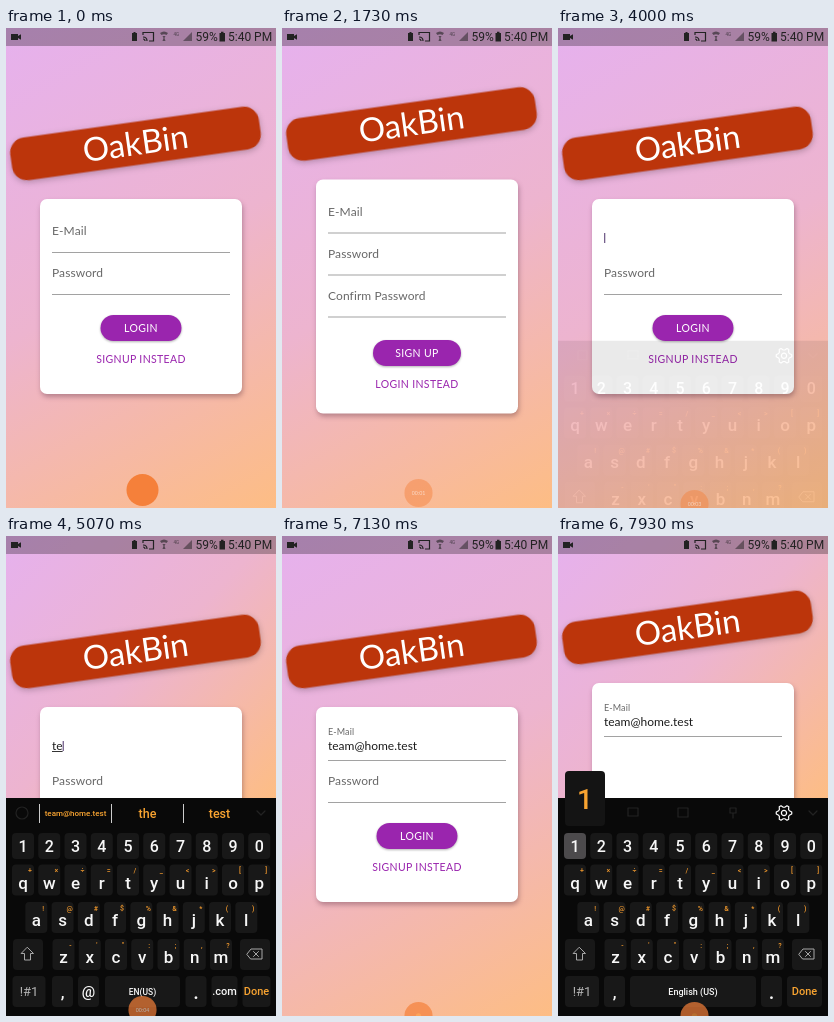
These frames come from a looping animation (270x480 px, 8000 ms). An HTML page:

```html
<!DOCTYPE html>
<html lang="en">
<head>
<meta charset="utf-8">
<title>Shop login</title>
<style>
  html, body { margin: 0; width: 100%; height: 100%; overflow: hidden; background: #fff; }
  svg { display: block; width: 100vw; height: 100vh; }
  text { font-family: Lato, "Open Sans", sans-serif; white-space: pre; }
  .mid { text-anchor: middle; }
  .label { font-size: 12px; fill: #686868; letter-spacing: .1px; }
  .value { font-size: 12px; fill: #1c1c1c; }
  .line { fill: #a2a2a2; }
  .caret { fill: #75608c; }
  .action { font-size: 10.5px; letter-spacing: .35px; }
  #banner rect { fill: #bc350b; filter: drop-shadow(0 2px 3px rgba(0,0,0,.24)); }
  #cardBox { fill: #fff; filter: drop-shadow(1px 3.5px 2.5px rgba(60,20,40,.32)); }
  #button { fill: #9a25ae; filter: drop-shadow(0 1.5px 1px rgba(0,0,0,.3)); }
  #status text, #keyboard text, #popup text { font-family: Roboto, "Noto Sans", sans-serif; }
  .key { fill: #181818; }
  .key.down { fill: #4c4a4c; }
  .glyph { fill: #f7f7f7; font-size: 17px; font-weight: 500; }
  .soft { fill: #b4b4b4; }
  .hint { fill: #f39a2d; font-size: 7px; font-weight: 500; }
  .orange { fill: #f9a431; font-weight: 500; }
  .icon { fill: none; stroke: #fff; stroke-width: 1.2; stroke-linejoin: round; stroke-linecap: round; }
  .dull { stroke: #a8a8a8; stroke-width: 1; }
  .faint { stroke: #222; }
</style>
</head>
<body>
<svg id="stage" viewBox="0 0 270 480" preserveAspectRatio="none">
  <defs>
    <linearGradient id="sky" gradientUnits="userSpaceOnUse" x1="0" y1="0" x2="270" y2="480">
      <stop offset="0" stop-color="#e6b1ee"/>
      <stop offset=".5" stop-color="#edb4cf"/>
      <stop offset="1" stop-color="#fdbd84"/>
    </linearGradient>
    <clipPath id="window"><rect id="windowBox" width="270" height="480"/></clipPath>
  </defs>

  <rect width="270" height="480" fill="#fff"/>
  <g clip-path="url(#window)">
    <rect width="270" height="480" fill="url(#sky)"/>
    <g id="scroll">
      <g id="banner" transform="translate(129.5 115.5) rotate(-8)">
        <rect x="-125.5" y="-21.5" width="251" height="43" rx="15"/>
        <text class="mid" y="11.5" font-size="33" fill="#fff">OakBin</text>
      </g>
      <rect id="cardBox" x="34" y="171" width="202" rx="7"/>
      <g id="fields">
        <text id="mailLabel" class="label" x="46">E-Mail</text>
        <text id="mailValue" class="value" x="46" y="213.5"></text>
        <rect id="composing" x="46" y="215" height="1" fill="#333"/>
        <rect id="mailLine" class="line" x="46" y="224" width="178" height="1"/>
        <rect id="mailCaret" class="caret" y="205" width="1.3" height="10"/>
        <text id="passLabel" class="label" x="46">Password</text>
        <rect id="passLine" class="line" x="46" y="266" width="178" height="1"/>
        <rect id="passCaret" class="caret" x="46" y="247" width="1.3" height="10"/>
        <g id="confirm">
          <text class="label" x="46" y="291">Confirm Password</text>
          <rect class="line" x="46" y="308" width="178" height="1"/>
        </g>
      </g>
      <g id="actions">
        <rect id="button" y="287" height="26" rx="13"/>
        <text id="mainAction" class="action mid" x="135" y="303.5" fill="#fff"></text>
        <text id="swapAction" class="action mid" x="135" y="335" fill="#9a25ae"></text>
      </g>
    </g>
  </g>

  <g id="status">
    <rect width="270" height="18" fill="#000" opacity=".28"/>
    <g fill="#222">
      <path d="M5 6h7v2l3-1.7v5.4l-3-1.7v2H5z"/>
      <path d="M126 5h1.500v-1h2v1h1.500v8h-5z"/>
      <path d="M154 5q4-3 8 0l-1.500 2q-2.500-1.700-5 0zM156.500 8h3l-1 2 1 3h-3l1-3z" opacity=".6"/>
      <path d="M186 4v9h-9z" opacity=".5"/>
      <path d="M213.500 5h1.500v-1.200h2.500V5h1.500v8.500h-5.500z"/>
      <text x="167.500" y="8" font-size="4.500" opacity=".7">4G</text>
      <text x="189.500" y="13" font-size="12">59%</text>
      <text x="222" y="13" font-size="12">5:40 PM</text>
    </g>
    <path d="M137 7V4.500h10.500v8.500H143M137 9q4 0 4 4M137 11q2 0 2 2" fill="none" stroke="#222" stroke-width="1.200"/>
  </g>

  <g id="keyboard">
    <rect y="262" width="270" height="280" fill="#090909"/>
    <g id="tools">
      <path class="icon faint" d="M20 272h9v9h-9zM70 272h10v8h-10zM120 272h10v9h-10zM172 272h6v5h-6zM175 277v5"/>
      <g transform="translate(226 277)">
        <path id="gear" class="icon"/>
        <circle class="icon" r="2.600"/>
      </g>
    </g>
    <g id="wordBar">
      <path d="M33.500 268v19M105.500 268v19M177.500 268v19" stroke="#ccc"/>
      <text class="orange mid" x="69.500" y="280" font-size="8">team@home.test</text>
      <text class="orange mid" x="141.500" y="281.500" font-size="12.500">the</text>
      <text class="orange mid" x="213.500" y="281.500" font-size="12.500">test</text>
    </g>
    <g id="mailBar">
      <path d="M33.500 268v18" stroke="#ddd"/>
      <text class="orange mid" x="151.500" y="281.500" font-size="12.500">team4@home.test</text>
    </g>
    <path class="icon faint" d="M251 275l4 4 4-4"/>
    <circle id="modeIcon" class="icon faint" cx="16" cy="277" r="6"/>
  </g>

  <g id="popup">
    <rect x="-20" y="-62" width="40" height="55" rx="4" fill="#141414"/>
    <text class="orange mid" y="-24" font-size="28"></text>
  </g>

  <g id="bubble">
    <circle r="16" fill="#f5803a"/>
    <text id="clock" class="mid" y="2" font-size="6" fill="#fff"></text>
    <circle id="dot" r="3" fill="#ff9a40"/>
  </g>
</svg>

<script>
const LOOP = 8000;
const $ = id => document.getElementById(id);
const clamp = v => Math.min(1, Math.max(0, v));
const ramp = (t, from, length) => clamp((t - from) / length);
const ease = p => p * p * (3 - 2 * p);
const mix = (a, b, p) => a + (b - a) * p;
const within = (t, from, to) => t >= from && t < to;
const set = (node, attrs) => { for (const k in attrs) node.setAttribute(k, attrs[k]); };
const show = (id, on) => set($(id), { opacity: +on });
const shift = (id, y) => set($(id), { transform: `translate(0 ${y})` });

function add(parent, tag, attrs, text) {
  const node = document.createElementNS('http://www.w3.org/2000/svg', tag);
  set(node, attrs);
  if (text) node.textContent = text;
  parent.append(node);
  return node;
}

// Keyboard
const keys = {};
function addKey(parent, name, x, y, w, h, size, cls = 'glyph') {
  const rect = add(parent, 'rect', { class: 'key', x: x - w / 2, y: y - h / 2, width: w, height: h, rx: 4 });
  if (name) add(parent, 'text', { class: cls + ' mid', x, y: y + size * .36, style: `font-size:${size}px` }, name);
  return keys[name] = { rect, x, top: y - h / 2 };
}

const board = $('keyboard');
const STEP = 26.25;
[...'1234567890'].forEach((c, i) => addKey(board, c, 17 + i * STEP, 310, 22, 26, 16));
const rows = [
  ['qwertyuiop', '+×÷=/_<>[]', 17, 344, 347],
  ['asdfghjkl', '!@#$%&*()', 30.3, 381.5, 384],
  ['zxcvbnm', '-\'":;,?', 57.5, 418.5, 421]
];
for (const [letters, hints, x0, y, textY] of rows) {
  [...letters].forEach((c, i) => {
    const x = x0 + i * STEP;
    keys[c] = addKey(board, '', x, y, 22, 31, 0);
    add(board, 'text', { class: 'glyph mid', x, y: textY + 5.5 }, c);
    add(board, 'text', { class: 'hint mid', x: x + 7, y: y - 7 }, hints[i]);
  });
}
addKey(board, '', 22, 418.5, 30, 31, 0);
addKey(board, '', 249, 418.5, 30, 31, 0);
add(board, 'path', { class: 'icon dull', d: 'M21.500 411.500l6 6h-3v6.500h-6v-6.500h-3z' });
add(board, 'path', { class: 'icon dull', d: 'M241 418l4-5h11v10h-11zM247.500 415.500l5 5M252.500 415.500l-5 5' });

const mailRow = add(board, 'g', {});
const passRow = add(board, 'g', {});
const bottom = (parent, list) => list.forEach(([name, x, w, size, cls]) =>
  addKey(parent, name, x, 455.5, w, 31, size, cls));
bottom(mailRow, [['!#1', 23, 33, 13, 'soft'], [',', 56.5, 21, 17], ['@', 82.5, 21, 15], ['EN(US)', 136.5, 75, 8.5],
  ['.', 190, 21, 20], ['.com', 218.5, 26, 11], ['Done', 250.5, 28, 11, 'orange']]);
const doneKey = keys.Done.rect;
bottom(passRow, [['!#1', 24, 34, 13, 'soft'], [',', 56.5, 21, 17], ['English (US)', 135, 126, 9],
  ['.', 213.5, 21, 20], ['Done', 246.5, 35, 11, 'orange']]);

// Gear outline: six teeth on a circle
let gear = '';
for (let i = 0; i < 24; i++) {
  const a = (i - .5) * Math.PI / 12, r = i % 4 < 2 ? 7.8 : 5.8;
  gear += (i ? 'L' : 'M') + (r * Math.cos(a)).toFixed(2) + ' ' + (r * Math.sin(a)).toFixed(2);
}
set($('gear'), { d: gear + 'z' });

const presses = [['t', 4470, 4670], ['e', 4930, 5030], ['1', 7930, LOOP]];

// The column stays centred, so banner and card rise as the card grows
function drawCard(t) {
  const open = ease(ramp(t, 1400, 300)) - ease(ramp(t, 2270, 300));
  const signup = within(t, 1400, 2270);
  const scroll = 24 * ease(ramp(t, 7400, 150));
  shift('scroll', -19.5 * open - scroll);
  set($('cardBox'), { height: 195 + 39 * open });
  shift('actions', 44.5 * open);
  set($('confirm'), { opacity: open, transform: `translate(0 ${-14 * (1 - open)})` });
  const w = signup ? 88 : 81;
  set($('button'), { x: 135 - w / 2, width: w });
  $('mainAction').textContent = signup ? 'SIGN UP' : 'LOGIN';
  $('swapAction').textContent = signup ? 'LOGIN INSTEAD' : 'SIGNUP INSTEAD';
}

// Focused labels and lines take the white accent, so they vanish on the card
function drawLabel(id, base, lift, opacity) {
  set($(id), { y: base - 8 * lift, opacity, style: `font-size:${mix(12, 9, lift)}px` });
}

function drawFields(t) {
  const mailLift = ease(ramp(t, 3700, 200));
  const mailSeen = 1 - ramp(t, 3700, 150) + ramp(t, 6450, 60);
  drawLabel('mailLabel', 207, mailLift, mailSeen);
  set($('mailLine'), { opacity: mailSeen });
  const passLift = ease(ramp(t, 7150, 200));
  const passSeen = 1 - ramp(t, 7150, 150);
  drawLabel('passLabel', 249, passLift, passSeen);
  set($('passLine'), { opacity: passSeen });

  const typed = t < 4670 ? '' : t < 5030 ? 't' : t < 5550 ? 'te' : 'team@home.test';
  $('mailValue').textContent = typed;
  const width = typed ? $('mailValue').getComputedTextLength() : 0;
  set($('composing'), { width, opacity: +(t < 5550) });
  set($('mailCaret'), { x: 46 + width });

  const since = t - [3700, 4670, 5030, 5550].reduce((a, b) => t >= b ? b : a, 0);
  show('mailCaret', within(t, 3700, 6450) && since % 1000 < 500);
  show('passCaret', t >= 7150 && (t - 7150) % 1000 < 500);
}

function drawKeyboard(t) {
  const leaving = ease(ramp(t, 6480, 200));
  const first = ease(ramp(t, 3960, 240)) - leaving;
  const second = ease(ramp(t, 7290, 240));
  const shown = t < 7000 ? first : second;
  const travel = within(t, 6480, 7000) ? 25 : 55;
  set(board, { opacity: shown });
  shift('keyboard', travel * (1 - shown));

  const pass = t > 7000;
  set(mailRow, { opacity: +!pass });
  set(passRow, { opacity: +pass });
  show('tools', t < 4670 || pass);
  show('wordBar', within(t, 4670, 5550));
  show('mailBar', within(t, 5550, 7000));
  show('modeIcon', within(t, 4670, 7000));
  doneKey.classList.toggle('down', within(t, 6200, 6700));

  show('popup', false);
  for (const [name, from, to] of presses) {
    const on = within(t, from, to), key = keys[name];
    key.rect.classList.toggle('down', on);
    if (!on) continue;
    set($('popup'), { opacity: 1, transform: `translate(${Math.max(27, key.x)} ${key.top})` });
    $('popup').lastElementChild.textContent = name;
  }

  const resized = within(t, 4200, 6430) || t >= 7400;
  const height = resized ? 262 : 480;
  set($('windowBox'), { height });
  set($('sky'), { y2: height });
}

function drawBubble(t) {
  const dim = ramp(t, 1330, 200), dock = ease(ramp(t, 3670, 250));
  const y = 462 + 3 * dim + 11 * dock - 2 * ramp(t, 4200, 200) + 6 * ramp(t, 6200, 200);
  const opacity = 1 - .55 * dim + .25 * ramp(t, 4200, 200);
  set($('bubble'), { transform: `translate(136.5 ${y}) scale(${mix(1, .88, dim)})`, opacity });
  $('clock').textContent = '00:0' + Math.floor(Math.max(0, t - 200) / 1000);
  show('clock', within(t, 1400, 6200));
  show('dot', t >= 6200);
}

const start = performance.now();
function frame() {
  const t = (performance.now() - start) % LOOP;
  drawCard(t);
  drawFields(t);
  drawKeyboard(t);
  drawBubble(t);
  requestAnimationFrame(frame);
}
frame();
</script>
</body>
</html>
```
